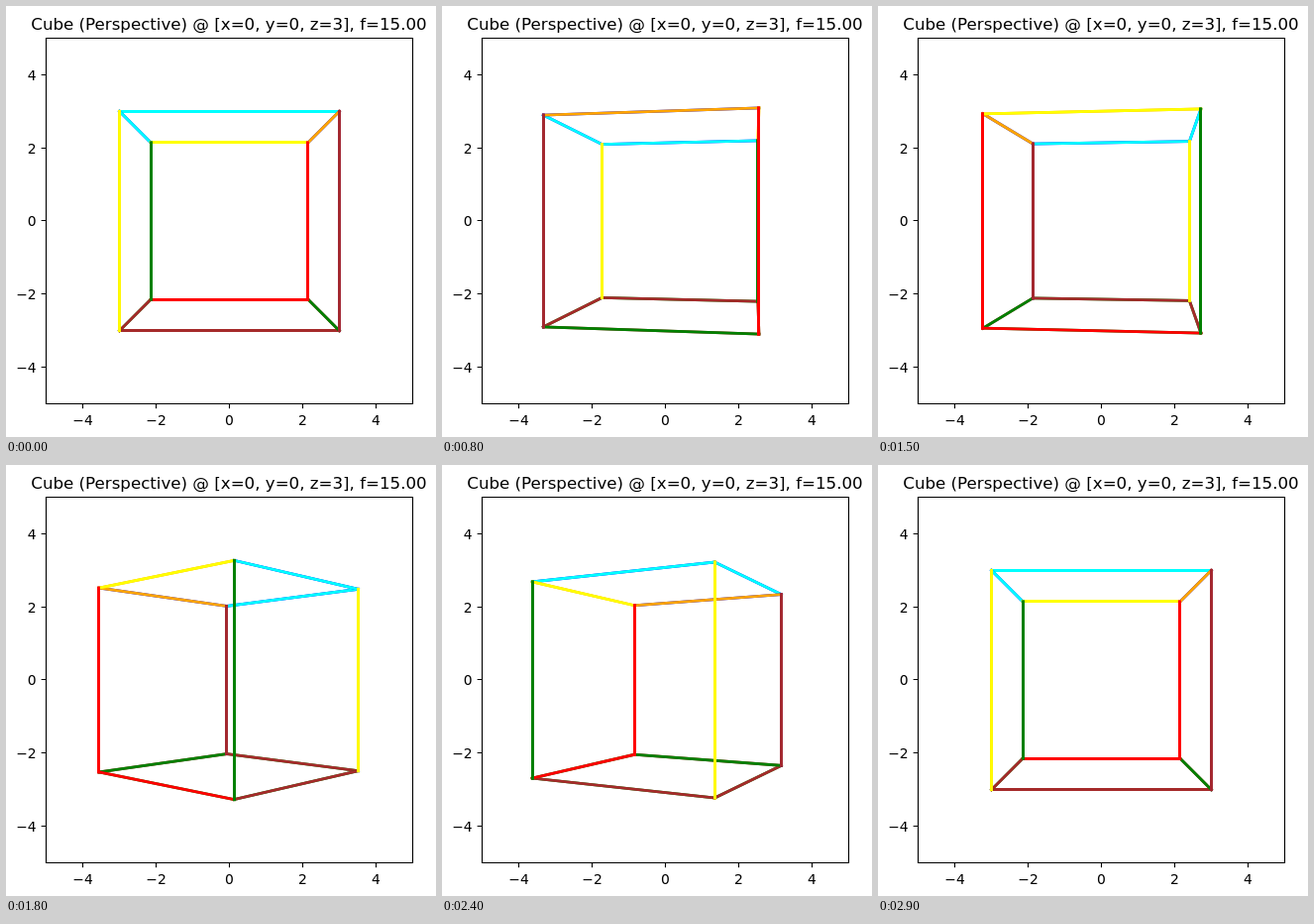
An HTML page for the animation above (3000 ms loop, 434x435 px).

```html
<!DOCTYPE html>
<html lang="en">
<head>
<meta charset="utf-8">
<title>Rotating cube</title>
<style>
  html, body { margin: 0; width: 100%; height: 100%; overflow: hidden; background: #fff; }
  svg { display: block; width: 434px; height: 435px; }
  text { font-family: "DejaVu Sans", sans-serif; font-size: 13.889px; }
  .title { font-size: 16.667px; }
  .axes { fill: none; stroke: #000; stroke-width: 1.11; }
  #cube { stroke-width: 2.78; stroke-linecap: square; }
</style>
</head>
<body>
<svg viewBox="0 0 434 435">
  <g id="cube"></g>
  <path class="axes" d="M40.5 32.5H410.5V401.5H40.5Z"/>
  <path class="axes" id="ticks"/>
  <g id="labels"><text class="title" x="225" y="24" text-anchor="middle">Cube (Perspective) @ [x=0, y=0, z=3], f=15.00</text></g>
</svg>
<script>
const CX = 225.5, CY = 217, UX = 37, UY = 36.9;
const FOCAL = 15, DIST = 3, HALF = 0.5;
const STEPS = 30, STEP_MS = 100;
const $ = id => document.getElementById(id);
const snap = v => Math.floor(v) + 0.5;

function add(parent, tag, attrs, text = '') {
  const el = document.createElementNS('http://www.w3.org/2000/svg', tag);
  for (const k in attrs) el.setAttribute(k, attrs[k]);
  el.textContent = text;
  return parent.appendChild(el);
}

// Axis ticks and labels
let ticks = '';
for (let v = -4; v <= 4; v += 2) {
  const x = snap(CX + v * UX), y = snap(CY - v * UY - 0.1);
  const label = String(v).replace('-', '\u2212');
  ticks += `M${x} 401.5v4.86M40.5 ${y}h-4.86`;
  add($('labels'), 'text', { x, y: 423, 'text-anchor': 'middle' }, label);
  add($('labels'), 'text', { x: 30.7, y: y + 5, 'text-anchor': 'end' }, label);
}
$('ticks').setAttribute('d', ticks);

// Corners 0-3 are the top (near left, near right, far right, far left), 4-7 the bottom.
const corners = [1, -1].flatMap(y =>
  [[-1, -1], [1, -1], [1, 1], [-1, 1]].map(([x, z]) => [x * HALF, y * HALF, z * HALF]));

// Each edge is stroked twice: under colour, then top colour.
const edges = [
  [4, 5, 'green', 'brown'], [7, 4, 'green', 'brown'],
  [5, 6, 'brown', 'green'], [6, 7, 'green', 'red'],
  [0, 1, 'blue', 'cyan'], [3, 0, 'blue', 'cyan'],
  [1, 2, 'blue', 'orange'], [2, 3, 'orange', 'yellow'],
  [0, 4, 'orange', 'yellow'], [1, 5, 'purple', 'brown'],
  [3, 7, 'green', 'green'], [2, 6, 'red', 'red']
];
const lines = edges.flatMap(([a, b, ...colors]) =>
  colors.map(stroke => ({ a, b, el: add($('cube'), 'line', { stroke }) })));

function project([x, y, z], angle) {
  const c = Math.cos(angle), s = Math.sin(angle);
  const k = FOCAL / (DIST + z * c - x * s);
  return [CX + (x * c + z * s) * k * UX, CY - y * k * UY];
}

function draw(step) {
  const angle = 2 * Math.PI * step / (STEPS - 1);
  const pts = corners.map(p => project(p, angle));
  for (const { a, b, el } of lines) {
    let [x1, y1] = pts[a], [x2, y2] = pts[b];
    if (Math.abs(x1 - x2) < 0.01) x1 = x2 = snap(x1);
    if (Math.abs(y1 - y2) < 0.01) y1 = y2 = snap(y1);
    const ends = { x1, y1, x2, y2 };
    for (const k in ends) el.setAttribute(k, ends[k].toFixed(2));
  }
}

const start = performance.now();
function tick() {
  draw(Math.floor((performance.now() - start) / STEP_MS) % STEPS);
  requestAnimationFrame(tick);
}
tick();
</script>
</body>
</html>
```
